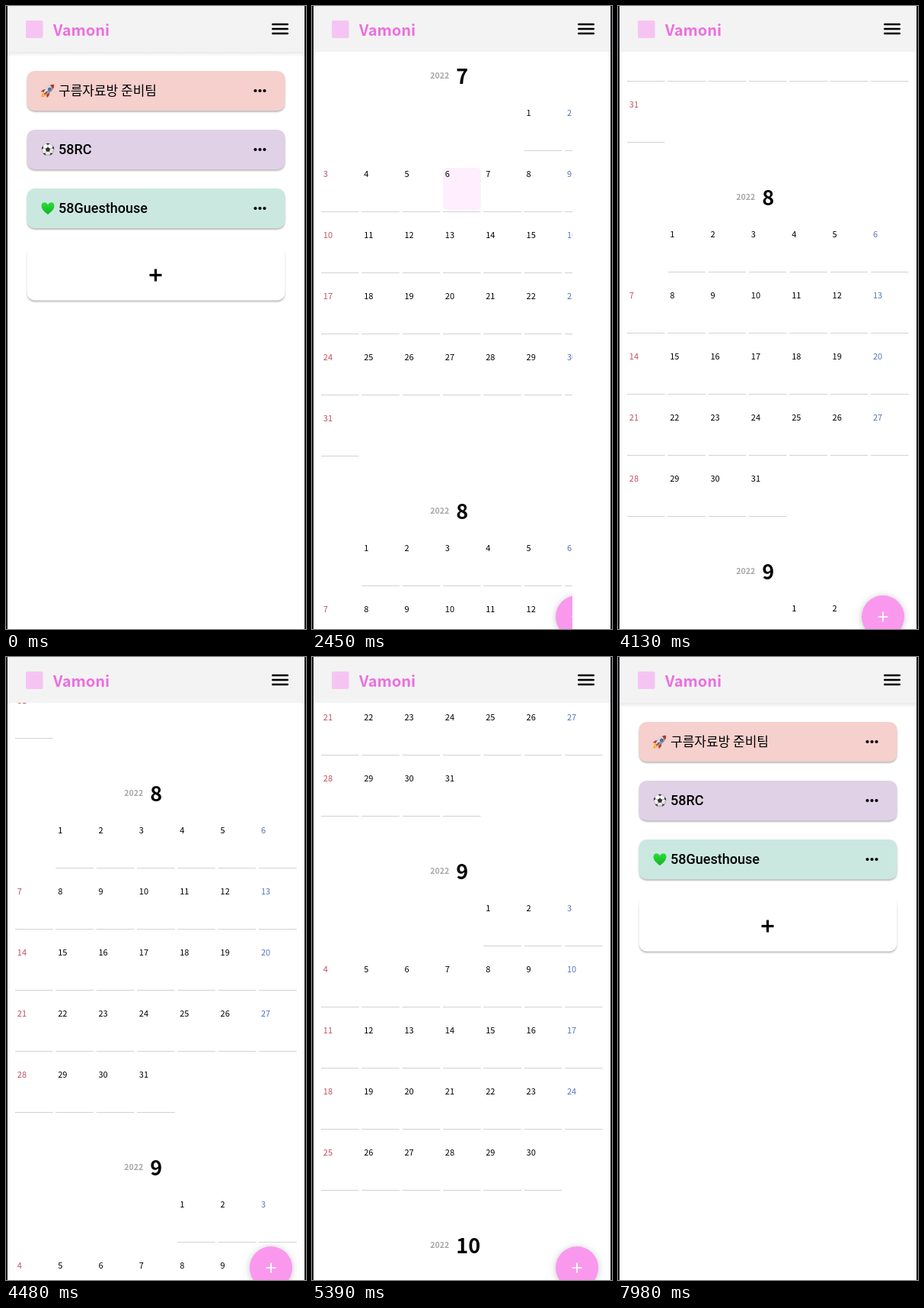
An HTML page with a canvas that plays this animation: 394 by 816 pixels, repeating every 8000 ms.

```html
<!DOCTYPE html>
<html lang="ko">
<head>
<meta charset="utf-8">
<title>Calendar app</title>
<style>
  html, body { margin: 0; width: 100%; height: 100%; overflow: hidden; background: #fff; }
  canvas { display: block; width: 394px; height: 816px; }
</style>
</head>
<body>
<canvas id="stage"></canvas>
<script>
const W = 394, H = 816, LOOP = 8000, STEP = 70, HEADER = 60;
const SANS = '"Noto Sans CJK KR", "Noto Sans CJK", sans-serif';
const LATIN = 'Roboto, sans-serif';
const canvas = document.getElementById('stage');
const ctx = canvas.getContext('2d');
const dpr = window.devicePixelRatio || 1;
canvas.width = W * dpr;
canvas.height = H * dpr;

const clamp = (v) => Math.max(0, Math.min(1, v));
const progress = (t, from, to) => clamp((t - from) / (to - from));
const easeOut = (p) => 1 - (1 - p) ** 3;
// A swipe: slow pick-up, then a long decay.
const flick = (p, pickup) => 1 - (1 - p ** pickup) ** 3;

function text(str, x, y, font, color) {
  ctx.font = font;
  ctx.fillStyle = color;
  ctx.fillText(str, x, y);
}

function rect(x, y, w, h, color) {
  ctx.fillStyle = color;
  ctx.fillRect(x, y, w, h);
}

function roundRect(x, y, w, h, r, color) {
  ctx.fillStyle = color;
  ctx.beginPath();
  ctx.roundRect(x, y, w, h, r);
  ctx.fill();
}

function circle(x, y, r, color) {
  ctx.fillStyle = color;
  ctx.beginPath();
  ctx.arc(x, y, r, 0, Math.PI * 2);
  ctx.fill();
}

function shape(path, color) {
  ctx.fillStyle = color;
  ctx.fill(new Path2D(path));
}

function withShadow(color, blur, dy, draw) {
  ctx.save();
  ctx.shadowColor = color;
  ctx.shadowBlur = blur * dpr;
  ctx.shadowOffsetY = dy * dpr;
  draw();
  ctx.restore();
}

function plus(x, y, size, weight, color) {
  rect(x - size / 2, y - weight / 2, size, weight, color);
  rect(x - weight / 2, y - size / 2, weight, size, color);
}

function at(x, y, angle, draw) {
  ctx.save();
  ctx.translate(x, y);
  ctx.rotate(angle);
  draw();
  ctx.restore();
}

function rocket() {
  at(55, 111, Math.PI / 4, () => {
    shape('M-2.2 5 Q-3 9 0 12 Q3 9 2.2 5Z', '#f5a623');
    shape('M-1 5 Q-1.4 8 0 9.5 Q1.4 8 1 5Z', '#ffe36b');
    shape('M-2.6 0 Q-6.4 2 -5.6 7.5 L-2 4.6Z M2.6 0 Q6.4 2 5.6 7.5 L2 4.6Z', '#b8322f');
    shape('M0 -11.5 Q4.4 -7 3.8 -1 Q3.4 3.5 2 5.6 L-2 5.6 Q-3.4 3.5 -3.8 -1 Q-4.4 -7 0 -11.5Z', '#8d98a5');
    shape('M0 -11.5 Q-4.4 -7 -3.8 -1 Q-3.4 3.5 -2 5.6 L-.2 5.6Z', '#d5dbe1');
    shape('M0 -11.5 Q2.3 -9.4 3 -7 L-3 -7 Q-2.3 -9.4 0 -11.5Z', '#b8322f');
    circle(0, -3, 2, '#3b4552');
    circle(0, -3, 1.2, '#3f8fc4');
    roundRect(-0.6, 1.5, 1.2, 5.5, 0.6, '#a12c28');
  });
}

function ball() {
  const fill = ctx.createRadialGradient(53, 184, 1, 55, 188, 8.5);
  fill.addColorStop(0, '#fff');
  fill.addColorStop(0.7, '#ececec');
  fill.addColorStop(1, '#aaa');
  ctx.save();
  ctx.beginPath();
  ctx.arc(55, 188, 8.3, 0, Math.PI * 2);
  ctx.clip();
  rect(46, 179, 18, 18, fill);
  ctx.translate(55, 188);
  shape('M0 -3.3 L3.2 -1 L2 2.8 L-2 2.8 L-3.2 -1Z', '#333');
  ctx.strokeStyle = '#999';
  ctx.lineWidth = 0.6;
  for (let i = 0; i < 5; i++) {
    ctx.beginPath();
    ctx.moveTo(0, -3);
    ctx.lineTo(0, -7);
    ctx.stroke();
    shape('M-2.7 -8 L0 -6 L2.7 -8 L2 -10 L-2 -10Z', '#333');
    ctx.rotate(Math.PI * 2 / 5);
  }
  ctx.restore();
}

function heart() {
  const fill = ctx.createLinearGradient(0, 257, 0, 273);
  fill.addColorStop(0, '#2fdc3c');
  fill.addColorStop(1, '#0fb523');
  shape('M55 273 C52 271 46.5 266.5 46.5 261.7 C46.5 256.3 53 255.8 55 260.3 C57 255.8 63.5 256.3 63.5 261.7 C63.5 266.5 58 271 55 273Z', fill);
}

const CARDS = [
  { y: 85, color: '#f5d0cd', label: '구름자료방 준비팀', font: `400 17px ${SANS}`, icon: rocket },
  { y: 162, color: '#e0d1e6', label: '58RC', font: `500 18px ${LATIN}`, icon: ball },
  { y: 239, color: '#cbe8e0', label: '58Guesthouse', font: `500 18px ${LATIN}`, icon: heart },
];

function drawCard(y, h, color) {
  withShadow('rgba(0,0,0,.25)', 2, 2, () => roundRect(27.5, y, 339, h, 10, color));
}

function drawList() {
  const shade = ctx.createLinearGradient(0, HEADER, 0, 66);
  shade.addColorStop(0, 'rgba(0,0,0,.09)');
  shade.addColorStop(1, 'rgba(0,0,0,0)');
  rect(2, HEADER, 390, 6, shade);
  for (const card of CARDS) {
    drawCard(card.y, 52, card.color);
    card.icon();
    text(card.label, 69, card.y + 32.3, card.font, '#000');
    for (const x of [327.5, 333.5, 339.5]) circle(x, card.y + 26, 2.1, '#000');
  }
  drawCard(316, 69.5, '#fff');
  plus(196.5, 352.5, 16, 3.2, '#000');
}

const MONTHS = [7, 8, 9, 10, 11];
const COLUMN = 53.35, ROW = 80;

function drawMonth(month, top) {
  const first = new Date(2022, month - 1, 1).getDay();
  const days = new Date(2022, month, 0).getDate();
  text('2022', 155.3, top + 4, `700 10.5px ${SANS}`, '#a6a6a6');
  text(String(month), 189.2, top + 11, `700 27px ${SANS}`, '#000');
  for (let day = 1; day <= days; day++) {
    const cell = first + day - 1, col = cell % 7;
    const x = 12 + col * COLUMN;
    const y = top + 49 + Math.floor(cell / 7) * ROW;
    if (month === 7 && day === 6) roundRect(x, y - 8, 49.7, 55, 5, '#feeefe');
    const color = col === 0 ? '#c2505f' : col === 6 ? '#5474bd' : '#000';
    text(String(day), x + 2.8, y + 4, `500 11px ${SANS}`, color);
    rect(x, y + 49, 49.5, 1, '#d2d2d2');
  }
  return 90 + ROW * Math.ceil((first + days) / 7);
}

function drawCalendar(scroll) {
  let top = 91 - scroll;
  for (const month of MONTHS) top += drawMonth(month, top);
  withShadow('rgba(0,0,0,.22)', 8, 1, () => circle(348, 800, 28, '#fa98ee'));
  plus(348, 800, 13, 1.8, '#fff');
}

function drawHeader() {
  rect(0, 0, W, HEADER, '#f3f3f3');
  roundRect(26, 19, 22.5, 23, 2, '#f6c4f3');
  text('Vamoni', 62, 38.6, `700 20px ${SANS}`, '#eb6fe0');
  for (const y of [24, 30, 36]) roundRect(349, y - 1.25, 22, 2.5, 1.2, '#000');
}

function reveal(amount, draw) {
  ctx.save();
  ctx.beginPath();
  ctx.rect(0, 0, Math.round(2 + 388 * amount) + (amount === 1 ? 2 : 0), H);
  ctx.clip();
  draw();
  ctx.restore();
}

function render(t) {
  ctx.setTransform(dpr, 0, 0, dpr, 0, 0);
  rect(0, 0, W, H, '#fff');
  if (t < 2100) {
    drawList();
  } else if (t < 6440) {
    const scroll = 483 * flick(progress(t, 3640, 4480), 1.4)
                 + 388 * flick(progress(t, 4480, 5320), 2);
    reveal(easeOut(progress(t, 2100, 2800)), () => drawCalendar(Math.round(scroll)));
  } else {
    reveal(easeOut(progress(t, 6440, 7000)), drawList);
  }
  drawHeader();
  rect(0, 0, 2, H, '#1d1c1f');
  rect(392, 0, 2, H, '#1d1c1f');
}

const start = performance.now();
function tick() {
  const t = (performance.now() - start) % LOOP;
  render(Math.floor(t / STEP) * STEP);
  requestAnimationFrame(tick);
}
tick();
</script>
</body>
</html>
```
